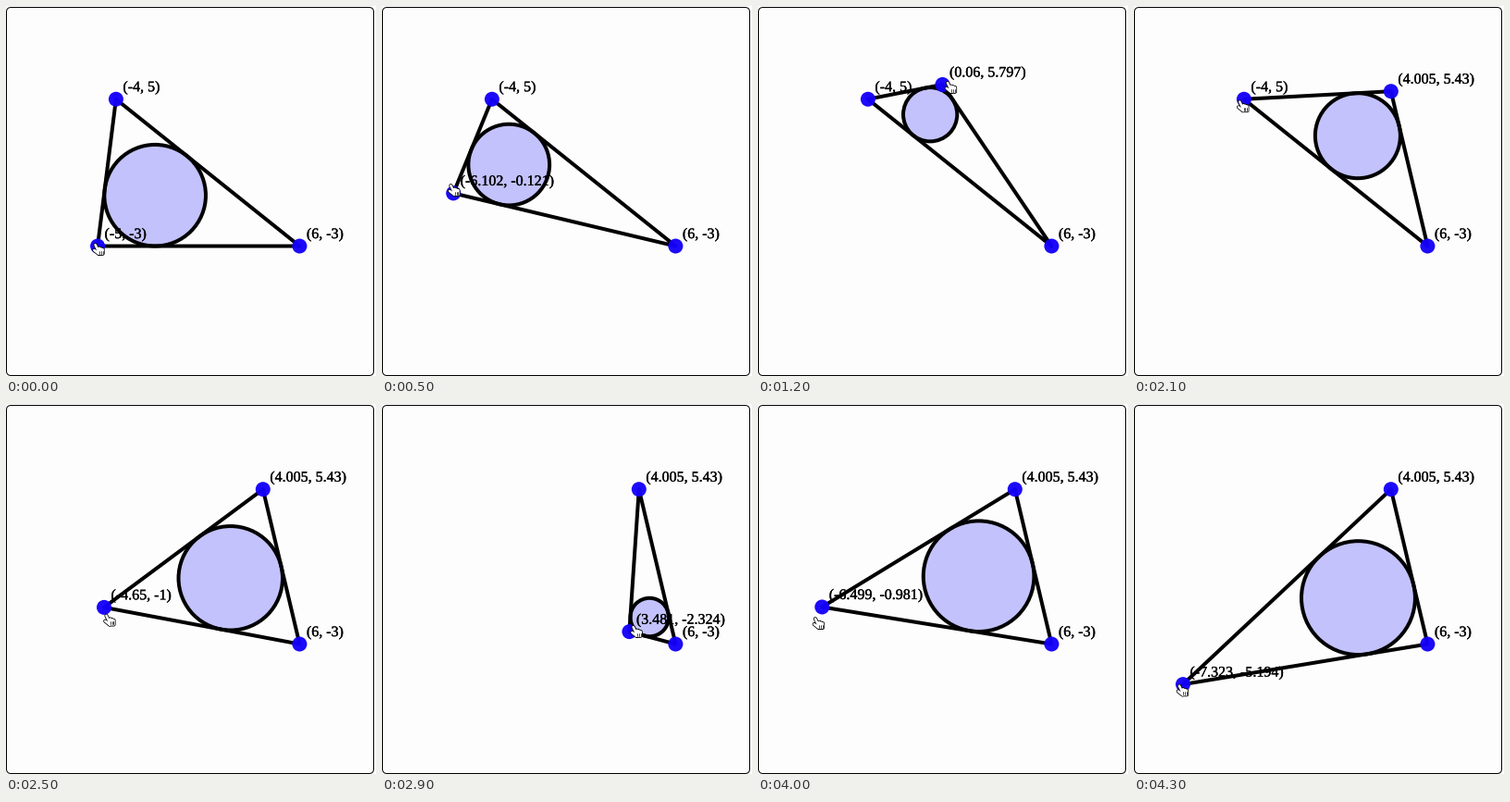
A matplotlib script that plays this animation: 400x400 px, repeating every 4400 ms.

```python
import numpy as np
import matplotlib as mpl
import matplotlib.pyplot as plt
from matplotlib.animation import FuncAnimation
from matplotlib.patches import Circle, FancyBboxPatch, Polygon
from matplotlib.patheffects import withStroke

SIZE, DPI = 400, 100
PT = 72 / DPI  # points per pixel
FRAMES, STEP = 44, 100
ORIGIN = np.array([198.3, 200.0])
UNIT = np.array([19.85, -19.85])
LEAD = 0.28  # the pointer runs slightly ahead of the dragged vertex
BLUE, FILL = "#1400fa", "#c3c2fc"

mpl.rcParams["font.family"] = "Liberation Serif"
mpl.rcParams["text.hinting"] = "none"

# Key points of each drag: (time in steps, x, y)
DRAG_1 = np.array([(2, -5, -3), (5, -6.102, -0.121), (8, -5.36, 3.93),
                   (12, 0.06, 5.797), (15, 4.005, 5.43)])
DRAG_2 = np.array([(21, -4, 5), (25, -4.65, -1), (27, -1.33, -3.3),
                   (29, 3.481, -2.324), (31, 5.12, 0.9), (33, 4.2, 4.3),
                   (36, -1.521, 5.721), (39, -5.7, 0.85), (43, -7.323, -5.194)])
FIXED = np.array([6.0, -3.0])
GRAB_1 = np.array([-3.5, -3.0])
GRAB_2 = np.array([-5.0, 0.0])
GLIDE = 15, 20  # the pointer moves from one vertex to the other


def follow(keys, t):
    """Smooth Hermite path through timed points, at rest at both ends."""
    times, pts = keys[:, 0], keys[:, 1:]
    t = np.clip(t, times[0], times[-1])
    slope = np.gradient(pts, times, axis=0)
    slope[0] = slope[-1] = 0
    i = min(np.searchsorted(times, t, side="right") - 1, len(times) - 2)
    h = times[i + 1] - times[i]
    u = (t - times[i]) / h
    return ((2 * u**3 - 3 * u**2 + 1) * pts[i]
            + (u**3 - 2 * u**2 + u) * h * slope[i]
            + (3 * u**2 - 2 * u**3) * pts[i + 1]
            + (u**3 - u**2) * h * slope[i + 1])


def to_px(p):
    return ORIGIN + UNIT * p


def number(v):
    text = f"{v:.3f}".rstrip("0").rstrip(".")
    return "0" if text == "-0" else text


def incircle(pts):
    sides = np.linalg.norm(np.roll(pts, -1, 0) - np.roll(pts, -2, 0), axis=1)
    (ux, uy), (vx, vy) = pts[1:] - pts[0]
    return sides @ pts / sides.sum(), abs(ux * vy - uy * vx) / sides.sum()


def pointer_at(t):
    first = to_px(follow(DRAG_1, t + LEAD)) + GRAB_1
    second = to_px(follow(DRAG_2, t + LEAD)) + GRAB_2
    u = np.clip((t - GLIDE[0]) / (GLIDE[1] - GLIDE[0]), 0, 1)
    return first + (second - first) * u * u * (3 - 2 * u)


def segments(*pairs):
    """Join separate strokes into one array, broken by gaps."""
    gap = (np.nan, np.nan)
    return np.array([p for a, b in pairs for p in (a, b, gap)])


fig = plt.figure(figsize=(SIZE / DPI, SIZE / DPI), dpi=DPI, facecolor="white")
ax = fig.add_axes([0, 0, 1, 1])
ax.set(xlim=(0, SIZE), ylim=(SIZE, 0))
ax.axis("off")

ax.add_patch(FancyBboxPatch(
    (0.5, 1.5), 397, 398, boxstyle="round,pad=0,rounding_size=5",
    fc="#fdfdfd", ec="black", lw=PT, zorder=0))
disc = ax.add_patch(Circle((0, 0), 1, fc=FILL, ec="black", lw=4 * PT, zorder=1))
outline = ax.add_patch(Polygon(np.zeros((3, 2)), fill=False, ec="black",
                               lw=4 * PT, joinstyle="round", zorder=2))
dots = [ax.add_patch(Circle((0, 0), 8, fc=BLUE, lw=0, alpha=0.96, zorder=3))
        for _ in range(3)]
bolder = [withStroke(linewidth=0.3 * PT, foreground="black")]
labels = [ax.text(0, 0, "", fontsize=16 * PT, va="baseline", zorder=4,
                  path_effects=bolder) for _ in range(3)]

# Pointing hand: index finger, thumb and three folded fingers
knuckles = 5.2 + 1.9 * np.arange(3)
HAND = segments(((1, 1.6), (4.6, 9)), ((-0.2, 7.4), (4.5, 11.2)),
                *[((x, 3.4 + 0.35 * x), (x, 11.2)) for x in knuckles])
CREASES = segments(*[((x, 8), (x, 11)) for x in knuckles])
hand = [(ax.plot([], [], color=color, lw=width * PT, solid_capstyle="round",
                 zorder=5)[0], shape)
        for color, width, shape in (("black", 4.2, HAND), ("white", 2.6, HAND),
                                    ("black", 0.7, CREASES))]


def draw(frame):
    pts = np.array([follow(DRAG_1, frame), follow(DRAG_2, frame), FIXED])
    px = to_px(pts)
    outline.set_xy(px)
    disc.center, disc.radius = incircle(px)
    for dot, label, p, (x, y) in zip(dots, labels, pts, px):
        dot.center = x, y
        label.set_position((x + 7.5, y - 8.5))
        label.set_text(f"({number(p[0])}, {number(p[1])})")
    tip = pointer_at(frame)
    for line, shape in hand:
        line.set_data(*(shape + tip).T)
    return [outline, disc, *dots, *labels, *(line for line, _ in hand)]


anim = FuncAnimation(fig, draw, frames=FRAMES, interval=STEP,
                     repeat=True, repeat_delay=0, blit=False)
plt.show()
```
